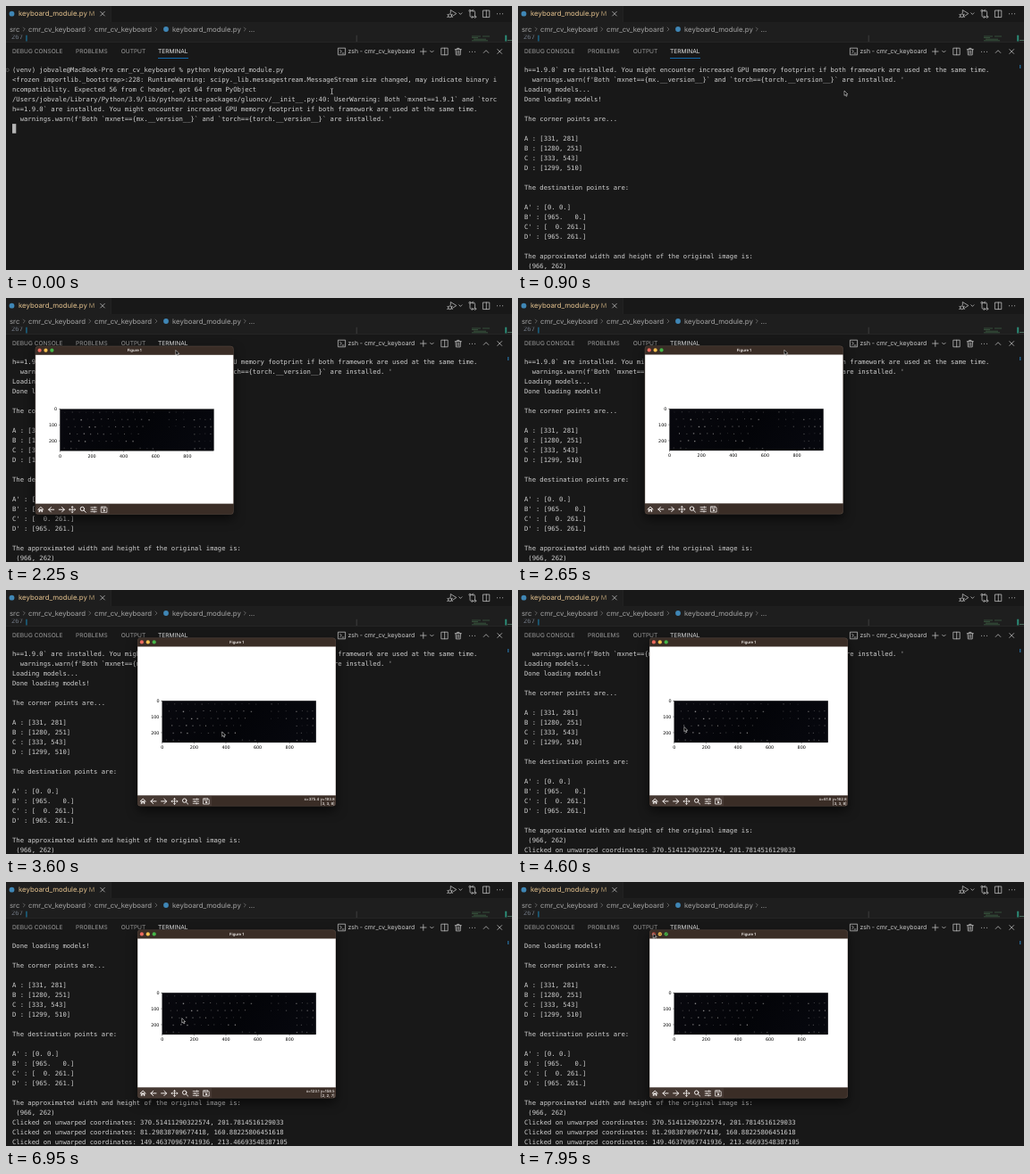
Write an HTML page that moves like this. It is 566x296 px and loops after 8 s.

```html
<!DOCTYPE html>
<html lang="en">
<head>
<meta charset="utf-8">
<title>Terminal and figure window</title>
<style>
  html, body { margin: 0; width: 100%; height: 100%; overflow: hidden; background: #181818; }
  svg { display: block; width: 100vw; height: 100vh; }
  text { white-space: pre; text-rendering: geometricPrecision; }
  .ui { font-family: Inter, Roboto, sans-serif; font-size: 7.8px; fill: #a3a3a3; }
  .tabs { font-size: 6.6px; fill: #9a9a9a; }
  .small { font-size: 4.3px; font-weight: 500; fill: #f4f0ee; }
  .mono { font-family: "DejaVu Sans Mono", monospace; font-size: 7.212px; fill: #d0d0d0; }
  .ticks { font-family: "DejaVu Sans", sans-serif; font-size: 4.82px; fill: #000; }
  .line { fill: none; stroke: #c5c5c5; stroke-width: .75; stroke-linecap: round; stroke-linejoin: round; }
  .dots { stroke-width: 1.1; }
  .crumb { stroke: #8a8a8a; stroke-width: .6; }
  .tools { stroke: #f4f0ee; stroke-width: 1; }
  #win { filter: drop-shadow(0 5px 6px rgba(0, 0, 0, .6)); }
</style>
</head>
<body>
<svg viewBox="0 0 566 296">
  <defs>
    <clipPath id="termClip"><rect y="66.6" width="566" height="229.4"/></clipPath>
    <clipPath id="peekClip"><rect y="32.5" width="566" height="7.5"/></clipPath>
    <clipPath id="winClip"><rect width="222" height="189" rx="3.5"/></clipPath>
    <linearGradient id="photo" x2="1" y2=".2">
      <stop offset="0" stop-color="#08080e"/><stop offset=".6" stop-color="#030408"/><stop offset="1" stop-color="#06070d"/>
    </linearGradient>
  </defs>

  <!-- editor header -->
  <rect width="566" height="296" fill="#181818"/>
  <rect y="18" width="566" height="22.5" fill="#1e1e1e"/>
  <rect width="117" height="18.5" fill="#1e1e1e"/>
  <rect x="117" width=".6" height="18" fill="#2b2b2b"/>
  <circle cx="6.5" cy="8.7" r="2.9" fill="#3f86b5"/>
  <g class="ui">
    <text x="14" y="11.4" fill="#e2c08d">keyboard_module.py</text>
    <text x="92.8" y="11.3" style="font-size:7.2px" fill="#a58e68">M</text>
    <text x="4" y="28.7">src</text>
    <text x="25" y="28.7">cmr_cv_keyboard</text>
    <text x="99" y="28.7">cmr_cv_keyboard</text>
    <text x="186" y="28.7">keyboard_module.py</text>
    <text x="271.5" y="28.7">...</text>
  </g>
  <circle cx="179" cy="26" r="2.9" fill="#3f86b5"/>
  <path class="line" d="M105.7 6.4l4.6 4.6m0-4.6l-4.6 4.6"/>
  <path class="line crumb" d="M19.3 24l2 2-2 2M92.8 24l2 2-2 2M167 24l2 2-2 2M266.3 24l2 2-2 2"/>
  <path class="line" d="M497.3 8V4.5l6.5 4-4 2.6M506.8 7.8l1.6 1.6 1.6-1.6"/>
  <circle class="line" cx="496.6" cy="10.8" r="1.9"/>
  <path class="line" d="M493.8 9.6l1 .4m-1.2 2.4l1.2-.4m3.6-2.2l1-.5m-1 2.6l1.1.5"/>
  <path class="line" d="M519 6.6v4.2q0 1.6 1.6 1.6h1.6m-1.1-1.2l1.2 1.2-1.2 1.2M524.6 11V6.8q0-1.6-1.6-1.6h-1.6m1.1-1.2l-1.2 1.2 1.2 1.2"/>
  <circle class="line" cx="519" cy="5.3" r="1.1"/><circle class="line" cx="524.6" cy="12.2" r="1.1"/>
  <path class="line" d="M533.8 5h7v7.6h-7zM537.3 5v7.6"/>
  <path class="line dots" d="M549.6 8.8h0m3 0h0m3 0h0"/>

  <!-- strip of editor left above the panel -->
  <g clip-path="url(#peekClip)">
    <text class="mono" x="6" y="36.8" style="fill:#6e7681">267</text>
    <rect x="22.3" y="32.5" width="1.3" height="7" fill="#1b6f96"/>
    <rect x="391.8" y="32.5" width=".7" height="7.5" fill="#4a4a4a"/>
    <path d="M521 34h10m2 0h8M521 35.6h7M523 37.2h14M521 38.8h18" stroke="#456b4c" stroke-width=".8" opacity=".85"/>
    <rect x="558.2" y="32.5" width="2" height="7" fill="#2b8a76"/>
    <rect x="561" y="38" width="5" height="1" fill="#4a6a5c"/>
  </g>

  <!-- panel header -->
  <rect y="40" width="566" height="256" fill="#181818"/>
  <rect y="40" width="566" height=".6" fill="#2d2d2d"/>
  <g class="ui tabs">
    <text x="7" y="53.4">DEBUG CONSOLE</text>
    <text x="78" y="53.4">PROBLEMS</text>
    <text x="128.7" y="53.4">OUTPUT</text>
    <text x="170" y="53.4" fill="#e7e7e7">TERMINAL</text>
    <text x="382.5" y="53.4" style="font-size:6.85px" fill="#ccc">zsh - cmr_cv_keyboard</text>
  </g>
  <rect x="170" y="58.2" width="34" height=".8" fill="#0f7fd4"/>
  <path class="line" d="M371.8 47.2h7.8v7.6h-7.8zM373.6 49.2l1.8 1.8-1.8 1.8m2.4.2h2"/>
  <path class="line" d="M463.5 51h6.6m-3.3-3.3v6.6M474.6 50.2l1.8 1.8 1.8-1.8"/>
  <path class="line" d="M487.2 47.2h7v7.6h-7zM490.7 47.2v7.6"/>
  <path class="line" d="M502.3 48.7h7m-4.7 0v-1.3h2.4v1.3m-4 0l.4 6.2h4.8l.4-6.2m-3.7 1.7v3m1.8-3v3"/>
  <path class="line dots" d="M518.6 51.2h0m3 0h0m3 0h0"/>
  <path class="line" d="M534.2 52.5l2.8-2.8 2.8 2.8M549.8 48.6l4.8 4.8m0-4.8l-4.8 4.8"/>

  <g clip-path="url(#termClip)">
    <g id="rows">
      <circle cx="1.6" cy="71.8" r="1.7" fill="none" stroke="#767676" stroke-width=".6"/>
      <rect id="caret" x="7" width="4.3" height="10.6" fill="#b4b4b4"/>
    </g>
  </g>
  <rect id="mark" x="561" y="66" width="1.4" height="4" fill="#24648f"/>

  <!-- figure window -->
  <g id="win">
    <g clip-path="url(#winClip)">
      <rect width="222" height="189" fill="#3a2d26"/>
      <rect y="10" width="222" height="166.8" fill="#fff"/>
      <rect x="1" y="177.6" width="82" height="11" fill="#fff" opacity=".06"/>
    </g>
    <rect x=".2" y=".2" width="221.6" height="188.6" rx="3.5" fill="none" stroke="#66574f" stroke-width=".4"/>
    <circle cx="4.9" cy="4.9" r="2.1" fill="#ec6a5e" id="close"/>
    <circle cx="11.8" cy="4.9" r="2.1" fill="#f4bf4f"/>
    <circle cx="18.7" cy="4.9" r="2.1" fill="#45b649"/>
    <path id="glyphs" d="M3.9 3.9l2 2m0-2l-2 2M10.5 4.9h2.6M17.8 5.8l1.8-1.8" stroke="#3a1d10" stroke-width=".6"/>
    <text class="ui small" x="111" y="6.5" text-anchor="middle" style="font-weight:600">Figure 1</text>
    <g id="axes" class="ticks"></g>
    <g class="line tools">
      <path d="M3.2 183.4l3-2.8 3 2.8"/><path d="M4.2 183.2h4v3h-1.2v-1.7h-1.6v1.7h-1.2z" fill="#f4f0ee" stroke-width=".3"/>
      <path d="M21 183.4h-6m2.7-2.7l-2.7 2.7 2.7 2.7M26.6 183.4h6m-2.7-2.7l2.7 2.7-2.7 2.7"/>
      <path d="M38 183.4h7m-3.5-3.5v7M39 182.5l-1 .9 1 .9m5-1.8l1 .9-1 .9m-3.4-3.4l.9-1 .9 1m-1.8 5l.9 1 .9-1" stroke-width=".8"/>
      <circle cx="52.7" cy="182.6" r="2.2"/><path d="M54.4 184.3l2.2 2.2"/>
      <path d="M62.2 181h6.4m-6.4 2.4h6.4m-6.4 2.4h6.4M66.6 180.3v1.4m-2.4 1v1.4m2 1v1.4" stroke-width=".75"/>
      <path d="M74 180.3h5l1.2 1.2v5h-6.2zM75.2 180.5v1.8h3v-1.8" stroke-width=".75"/><circle cx="77" cy="184.5" r=".7"/>
    </g>
    <g class="ui small" text-anchor="end">
      <text id="pos" x="220.7" y="182.3"></text>
      <text id="rgb" x="220.7" y="187.6"></text>
    </g>
  </g>

  <g id="pointer">
    <path id="arrow" d="M0 0v5.4l1.2-1.1.9 2 1-.4-.9-2h1.7z" fill="#000" stroke="#fff" stroke-width=".5" stroke-linejoin="round"/>
    <path id="beam" d="M-1.2-1.6q1.2 0 1.2.8 0-.8 1.2-.8M0-.8v4.6M-1.2 4.6q1.2 0 1.2-.8 0 .8 1.2.8" fill="none" stroke="#d8d8d8" stroke-width=".7"/>
  </g>
</svg>
<script>
const DURATION = 8000, ROW = 10.97;
const $ = id => document.getElementById(id);

function add(parent, tag, attrs, text) {
  const node = document.createElementNS("http://www.w3.org/2000/svg", tag);
  for (const key in attrs) node.setAttribute(key, attrs[key]);
  if (text !== undefined) node.textContent = text;
  return parent.appendChild(node);
}

const output = `(venv) jobvale@MacBook-Pro cmr_cv_keyboard % python keyboard_module.py
<frozen importlib._bootstrap>:228: RuntimeWarning: scipy._lib.messagestream.MessageStream size changed, may indicate binary i
ncompatibility. Expected 56 from C header, got 64 from PyObject
/Users/jobvale/Library/Python/3.9/lib/python/site-packages/gluoncv/__init__.py:40: UserWarning: Both \`mxnet==1.9.1\` and \`torc
h==1.9.0\` are installed. You might encounter increased GPU memory footprint if both framework are used at the same time.
  warnings.warn(f'Both \`mxnet=={mx.__version__}\` and \`torch=={torch.__version__}\` are installed. '
Loading models...
Done loading models!

The corner points are...

A : [331, 281]
B : [1280, 251]
C : [333, 543]
D : [1299, 510]

The destination points are:

A' : [0. 0.]
B' : [965.   0.]
C' : [  0. 261.]
D' : [965. 261.]

The approximated width and height of the original image is:
 (966, 262)
Clicked on unwarped coordinates: 370.51411290322574, 201.7814516129033
Clicked on unwarped coordinates: 81.29838709677418, 160.88225806451618
Clicked on unwarped coordinates: 149.46370967741936, 213.46693548387105`.split("\n");

const rows = output.map((line, i) =>
  add($("rows"), "text", { class: "mono", x: 7, y: 74.4 + i * ROW }, line));

// Axes inside the window: image data of 966 x 262 units
const AX = { x: 27.75, y: 70.8, w: 172, h: 46.65 };
const UNIT = AX.w / 966;

function drawAxes() {
  const g = $("axes");
  add(g, "rect", { x: AX.x, y: AX.y, width: AX.w, height: AX.h, fill: "url(#photo)", stroke: "#000", "stroke-width": .3 });
  for (let v = 0; v <= 800; v += 200) {
    const x = AX.x + v * UNIT;
    add(g, "path", { d: `M${x} ${AX.y + AX.h}v1.6`, stroke: "#000", "stroke-width": .35 });
    add(g, "text", { x, y: AX.y + AX.h + 7.4, "text-anchor": "middle" }, v);
  }
  for (let v = 0; v <= 200; v += 100) {
    const y = AX.y + v * UNIT;
    add(g, "path", { d: `M${AX.x} ${y}h-1.6`, stroke: "#000", "stroke-width": .35 });
    add(g, "text", { x: AX.x - 3.3, y: y + 1.8, "text-anchor": "end" }, v);
  }
  let seed = 7;
  const random = () => (seed = seed * 16807 % 2147483647) / 2147483647;
  const keys = (row, from, count, pitch, glow) => {
    for (let i = 0; i < count; i++) add(g, "rect", {
      x: AX.x + from + i * pitch + random() * 1.2, y: AX.y + 2.5 + row * 8.1 + random() * .8,
      width: .6 + random() * .9, height: .7 + random() * .9,
      fill: "#b9b6b4", opacity: glow * (.35 + random() * .65)
    });
  };
  for (let row = 0; row < 6; row++) {
    if (row < 5) keys(row, 5 + row * 1.7, 14 - row, 7.6, row ? .75 : .3);
    else { keys(row, 4, 3, 7, .5); keys(row, 89, 3, 7, .5); }
    if (row < 3) keys(row, 121, 3, 8, .45);
    if (row) keys(row, 149, 4, 6, .5);
  }
}
drawAxes();

const smooth = s => s * s * (3 - 2 * s);

// Rows are [time, ...values]; eased between neighbours
function track(table, t) {
  const next = table.findIndex(k => k[0] > t);
  if (next < 0) return table.at(-1).slice(1);
  if (next === 0) return table[0].slice(1);
  const a = table[next - 1], b = table[next], s = smooth((t - a[0]) / (b[0] - a[0]));
  return a.slice(1).map((v, i) => v + (b[i + 1] - v) * s);
}
const step = (table, t) => table.filter(k => k[0] <= t).at(-1);

const WIN = [[2050, 2, 53.9], [2728, 147, 53.5]];
const onImage = (x, y) => [147 + AX.x + (x + .5) * UNIT, 53.5 + AX.y + (y + .5) * UNIT];
const POINTER = [
  [0, 364.5, 94.2], [600, 364.5, 94.2], [850, 365, 95], [1200, 365, 95],
  [1900, 159.5, 58.6], [2050, 159.5, 58.6], [2728, 303, 58.2], [2950, 303, 58.2],
  [3650, ...onImage(370.5, 201.8)], [3950, ...onImage(370.5, 201.8)],
  [4550, ...onImage(61.8, 162.8)], [4700, ...onImage(61.8, 162.8)],
  [5100, ...onImage(81.3, 160.9)], [5500, ...onImage(81.3, 160.9)],
  [6050, ...onImage(155.3, 215.4)], [6200, ...onImage(155.3, 215.4)],
  [6350, ...onImage(149.5, 213.5)], [6800, ...onImage(149.5, 213.5)],
  [7600, 151.2, 57.6]
];
// [time, printed lines, scrolled lines]
const PRINTED = [[0, 6, 0], [250, 7, 0], [650, 8, 0], [750, 25, 4], [3850, 26, 5], [5400, 27, 6], [6500, 28, 7]];
const OPENED = 1350;

const show = (node, on) => node.setAttribute("visibility", on ? "visible" : "hidden");

function render(t) {
  const [, count, scroll] = step(PRINTED, t);
  rows.forEach((row, i) => show(row, i < count));
  $("caret").setAttribute("y", 66.3 + count * ROW);
  $("rows").setAttribute("transform", `translate(0 ${-scroll * ROW})`);
  show($("mark"), scroll > 0);

  const [wx, wy] = track(WIN, t), [px, py] = track(POINTER, t);
  const open = t >= OPENED;
  $("win").style.display = open ? "" : "none";
  $("win").setAttribute("transform", `translate(${wx} ${wy})`);
  $("pointer").setAttribute("transform", `translate(${px} ${py})`);
  show($("beam"), t < 850);
  show($("arrow"), t >= 850);

  const lx = px - wx, ly = py - wy;
  const hover = open && lx > 1 && lx < 22 && ly > 1 && ly < 9;
  show($("glyphs"), hover);
  $("close").setAttribute("fill", hover && t > 7800 ? "#b9493f" : "#ec6a5e");

  const x = (lx - AX.x) / UNIT - .5, y = (ly - AX.y) / UNIT - .5;
  const inside = open && x > 0 && x < 966 && y > 0 && y < 262;
  const tone = 2 + (Math.round(x) + Math.round(y)) % 2;
  $("pos").textContent = inside ? `x=${x.toFixed(1)} y=${y.toFixed(1)}` : "";
  $("rgb").textContent = inside ? `[${tone}, ${tone}, ${tone + 5}]` : "";
}

const start = performance.now();
function frame() {
  render((performance.now() - start) % DURATION);
  requestAnimationFrame(frame);
}
frame();
</script>
</body>
</html>
```
